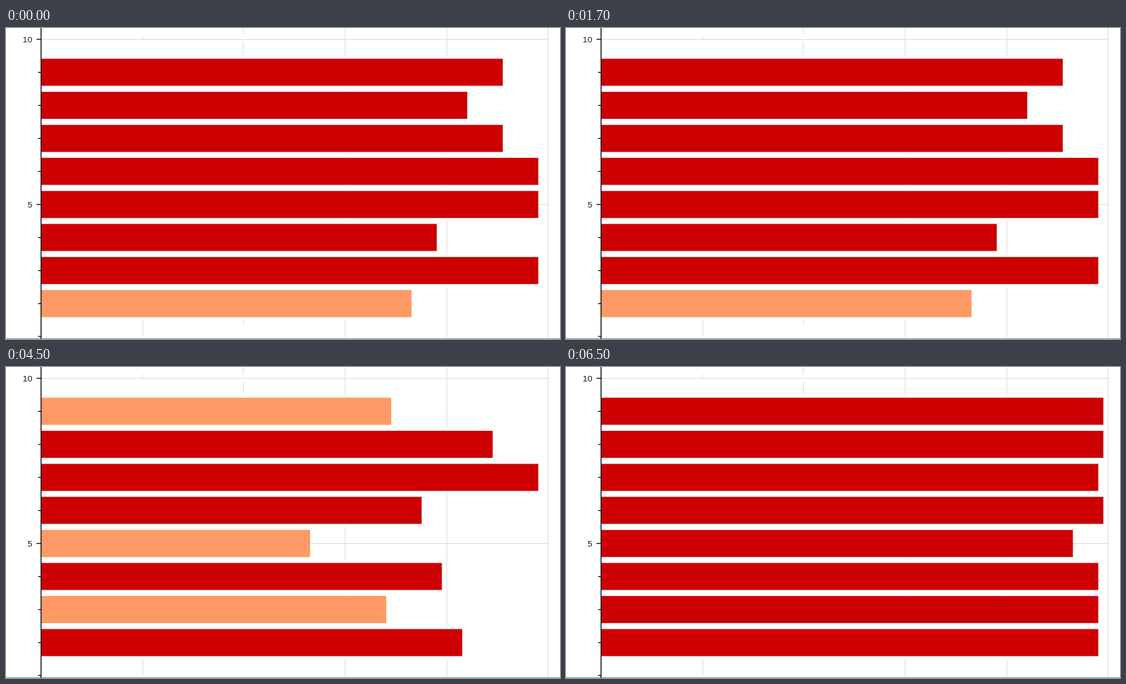
An HTML page for the animation above (8 s loop, 998x561 px).

```html
<!DOCTYPE html>
<html lang="en">
<head>
<meta charset="utf-8">
<title>Bar chart</title>
<style>
  html, body { margin: 0; width: 100%; height: 100%; overflow: hidden; background: #fff; }
  svg { display: block; width: 100%; height: 100%; }
  text { font: 15.5px "Liberation Sans", Arial, sans-serif; fill: #222; text-anchor: end; }
</style>
</head>
<body>
<svg id="chart" viewBox="0 0 998 561"></svg>
<script>
const LOOP = 8000;
const LEFT = 63.3, UNIT = 9.14;          // value axis
const TOP = 55.4, STEP = 59.6, BAR = 49; // rows
const GAP = 5;                           // blank margin above and below a bar

// Values from the top row down; each set holds until the next start time.
const SETS = [
  { start: 0,    values: [91, 84, 91, 98, 98, 78, 98, 73] },
  { start: 2500, values: [92, 96, 99, 65, 91, 65, 80, 33] },
  { start: 4500, values: [69, 89, 98, 75, 53, 79, 68, 83] },
  { start: 6500, values: [99, 99, 98, 99, 93, 98, 98, 98] }
];
const RED = { fill: "#cc0000", edge: "#cc1f2a" };
const ORANGE = { fill: "#ff9966", edge: "#f99d4b" };
const TEAL = { fill: "#99cccc", edge: "#99cccc" };
const toneOf = v => v >= 75 ? RED : v >= 50 ? ORANGE : TEAL;

const chart = document.getElementById("chart");

function add(tag, attrs, text) {
  const el = document.createElementNS("http://www.w3.org/2000/svg", tag);
  set(el, attrs);
  if (text) el.textContent = text;
  return chart.appendChild(el);
}
function set(el, attrs) {
  for (const key in attrs) el.setAttribute(key, attrs[key]);
}
function box(x, y, width, height, fill) {
  return add("rect", { x, y, width, height, fill });
}

// Grid
const GRID = "#d4d4d4";
const vertical = (x, from, to) => box(x, from, 1, to - from, GRID);
vertical(246, 14, 20);
vertical(246, 522, 556);
vertical(427, 0, 13);
vertical(427, 26, 48);
const stub = vertical(427, 527, 536);
for (const x of [610.5, 793.5, 976]) vertical(x, 0, 561);
for (const y of [20, 318]) box(64, y, 913, 1, GRID);

// Bars
const rows = SETS[0].values.map((_, i) => {
  const y = TOP + i * STEP;
  return {
    halo: box(LEFT, y - GAP, 0, BAR + 2 * GAP, "#fff"),
    bar: add("rect", { x: LEFT + 0.5, y: y + 0.5, height: BAR - 1 })
  };
});

// Axes, ticks and labels
box(0, 560, 998, 1, "#777");
box(62.4, 0, 1.6, 561, "#000");
for (let n = 1; n <= 10; n++) {
  const y = n === 1 ? 556 : 20 + (10 - n) * STEP;
  const major = n % 5 === 0;
  const length = major ? 8 : 5;
  box(63 - length, y - 0.4, length, 1.6, "#000");
  if (major) add("text", { x: 47.3, y: y + 5.6 }, String(n));
}

let shown = null;
function draw(time) {
  const current = SETS.filter(s => s.start <= time % LOOP).pop();
  if (current === shown) return;
  shown = current;
  set(stub, { opacity: current === SETS[0] ? 1 : 0 });
  rows.forEach(({ halo, bar }, i) => {
    const value = current.values[i];
    const width = value * UNIT;
    const tone = toneOf(value);
    set(halo, { width });
    set(bar, { width: width - 1, fill: tone.fill, stroke: tone.edge });
  });
}

const origin = performance.now();
function tick() {
  draw(performance.now() - origin);
  requestAnimationFrame(tick);
}
tick();
</script>
</body>
</html>
```
